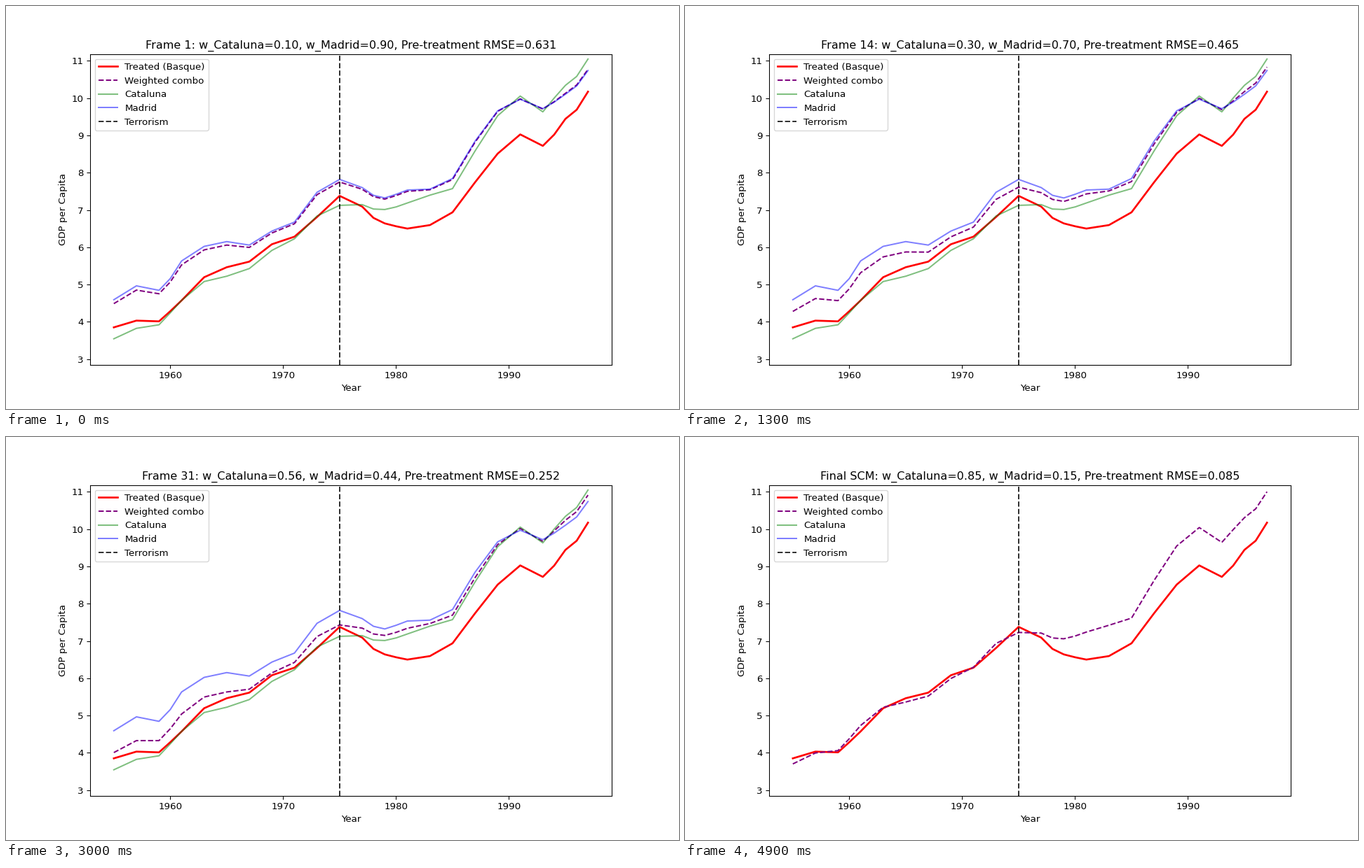
A matplotlib script for the animation above (10000 ms loop, 960 px wide and 576 px high).

```python
import numpy as np
import matplotlib.pyplot as plt
from matplotlib.animation import FuncAnimation

STEPS = 50        # weight steps before the result is held
FRAMES = 100
INTERVAL = 100    # ms

years = np.arange(1955, 1998)
# Bends of the curves: every second year, plus a few sharper turns.
knots = sorted([*range(1955, 1998, 2), 1960, 1978, 1980, 1994, 1996])


def curve(*values):
    return np.interp(years, knots, values)


basque = curve(3.853, 4.034, 4.014, 4.286, 4.574, 5.197, 5.465, 5.615, 6.081,
               6.284, 6.811, 7.378, 7.090, 6.787, 6.640, 6.563, 6.501, 6.595,
               6.937, 7.743, 8.510, 9.025, 8.718, 9.018, 9.441, 9.687, 10.171)
cataluna = curve(3.547, 3.827, 3.922, 4.242, 4.575, 5.081, 5.224, 5.429, 5.916,
                 6.228, 6.838, 7.124, 7.143, 7.025, 7.012, 7.081, 7.187, 7.397,
                 7.572, 8.583, 9.525, 10.053, 9.630, 9.998, 10.340, 10.580, 11.046)
madrid = curve(4.594, 4.966, 4.846, 5.161, 5.633, 6.024, 6.152, 6.059, 6.434,
               6.675, 7.474, 7.819, 7.600, 7.393, 7.322, 7.420, 7.534, 7.558,
               7.843, 8.845, 9.657, 9.968, 9.715, 9.890, 10.102, 10.325, 10.738)

weights = np.linspace(0.10, 0.85, STEPS)
pre = years < 1975

fig, ax = plt.subplots(figsize=(10, 6), dpi=96)
ax.plot(years, basque, color="red", lw=2, label="Treated (Basque)")
combo, = ax.plot(years, madrid, color="purple", ls="--", label="Weighted combo")
donors = [
    ax.plot(years, data, color=color, alpha=0.5, label=label)[0]
    for data, color, label in [(cataluna, "green", "Cataluna"),
                               (madrid, "blue", "Madrid")]
]
ax.axvline(1975, color="black", ls="--", alpha=0.8, label="Terrorism")
ax.set_ylim(basque.min() - 1, basque.max() + 1)
ax.set_xlabel("Year")
ax.set_ylabel("GDP per Capita")
ax.legend(loc="upper left")
title = ax.set_title("")


def update(i):
    step = min(i, STEPS - 1)
    final = step == STEPS - 1
    w = weights[step]
    mix = w * cataluna + (1 - w) * madrid
    rmse = np.sqrt(np.mean((basque - mix)[pre] ** 2))
    combo.set_ydata(mix)
    for line in donors:
        line.set_visible(not final)
    head = "Final SCM" if final else f"Frame {step + 1}"
    title.set_text(f"{head}: w_Cataluna={w:.2f}, w_Madrid={1 - w:.2f}, "
                   f"Pre-treatment RMSE={rmse:.3f}")
    return [combo, title, *donors]


anim = FuncAnimation(fig, update, frames=FRAMES, interval=INTERVAL,
                     init_func=lambda: update(0), repeat=True, repeat_delay=0)
plt.show()
```
